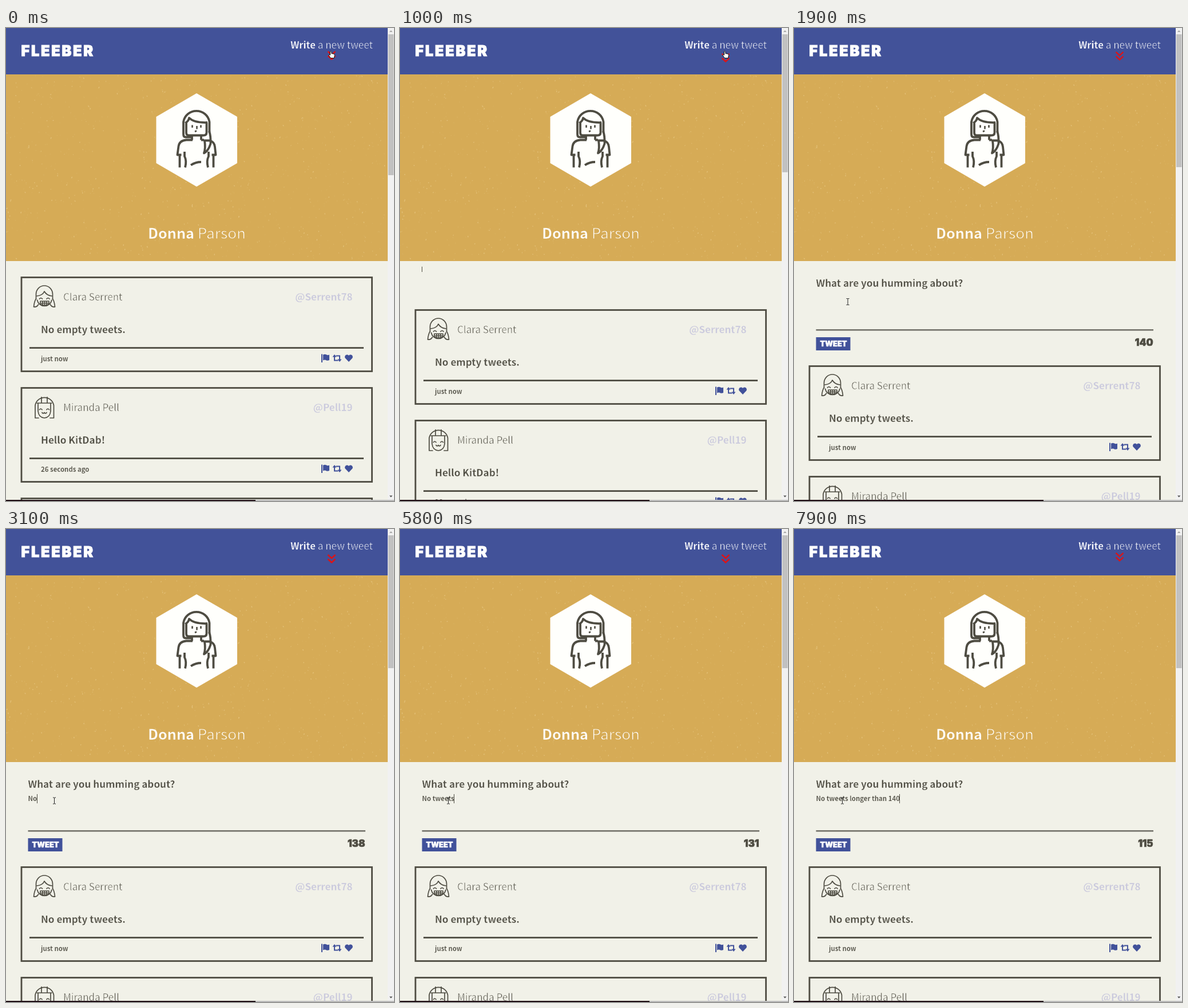
Animation, 678 px wide and 826 px high, one loop 8000 ms. Source, as an HTML page:

```html
<!DOCTYPE html>
<html lang="en">
<head>
<meta charset="utf-8">
<title>Message feed</title>
<style>
  html, body { margin: 0; width: 100%; height: 100%; overflow: hidden; background: #f1f1e8; }
  svg { display: block; width: 678px; height: 826px; --bg: #f1f1e8; }
  text { font-family: "Noto Sans CJK JP", "Noto Sans CJK SC", "Noto Sans", sans-serif; white-space: pre; fill: #4e4c42; }
  /* A stroke in the ground colour thins the letters */
  .semi { font-weight: 600; stroke: var(--bg); stroke-width: .018em; }
  .light { font-weight: 300; stroke: var(--bg); stroke-width: .032em; }
  .chunky { font-family: Inter, "DejaVu Sans", sans-serif; font-weight: 900; stroke-width: .04em; }
  .line { fill: none; stroke: #4e4c42; stroke-linecap: round; stroke-linejoin: round; }
</style>
</head>
<body>
<svg viewBox="0 0 678 826" xmlns="http://www.w3.org/2000/svg">
  <defs>
    <clipPath id="clip"><rect id="clipBox" x="25" width="616"/></clipPath>
    <g id="actions" fill="#41519a">
      <path d="M551 569.5h2V584h-2zM554 570.5q3.500 -1.500 6 0t5 0v9.500q-3 1.500 -5.500 .2t-5.500 .3z"/>
      <path d="M574 572V580.500H580.500M576.500 572.500H583V581" fill="none" stroke="#41519a" stroke-width="2"/>
      <path d="M570.500 574.500l3.500 -4.500l3.500 4.500zM579.500 578.500l3.500 4.500l3.500 -4.500z"/>
      <path d="M599 583l-6 -6.200c-3 -3.500 2 -9 6 -4.800c4 -4.200 9 1.300 6 4.800z"/>
    </g>
    <g id="face0" class="line" stroke-width="1.700">
      <path d="M52.500 473V465a14.500 15 0 0 1 29 0V473M54 468q10 -1 13 -8q4 7 13 8"/>
      <path d="M54.500 475a13 13 0 0 0 25.500 0M52.500 473q-3 4 -4 14q5 1 8 -4M81.500 473q3 4 4 14q-5 1 -8 -4"/>
      <path d="M58.500 473q2.500 -3 5 0M71 473q2.500 -3 5 0M60 477h15q1 7 -5 7h-5q-6 0 -5 -7zM60.500 480.500h14M64 477v6.500M67.500 477v7M71 477v6.500"/>
    </g>
    <g id="face1" class="line" stroke-width="1.700">
      <path d="M57 488H51V466a16.500 16.500 0 0 1 32.500 0V488H77"/>
      <path d="M56 462v14q1 11 11 12q10 -1 11 -12V462M54 462h26M62 451.500v10M72 451.500v10"/>
      <path d="M58.500 473.500q2 -3 4.500 0M71 473.500q2 -3 4.500 0M63 478.500q2 3 4 0q2 3 4 0"/>
    </g>
  </defs>

  <rect width="678" height="826" fill="#f1f1e8"/>
  <g id="feed"></g>

  <g clip-path="url(#clip)">
    <g id="form">
      <text x="38.500" y="452" class="semi" font-size="17.100">What are you humming about?</text>
      <text id="typed" x="38.500" y="475.300" class="semi" font-size="11.400"></text>
      <rect id="caret" y="463" width="1" height="16" fill="#4e4c42"/>
      <rect x="38.500" y="526" width="589.500" height="2.600" fill="#74736b"/>
      <rect x="38.500" y="540" width="60" height="23" fill="#41519a"/>
      <text x="69" y="555.500" class="chunky" font-size="12.800" text-anchor="middle" style="fill:#fff" stroke="#fff">TWEET</text>
      <text id="count" x="627.500" y="555" class="chunky" font-size="17" text-anchor="end" stroke="#4e4c42"></text>
    </g>
  </g>

  <rect y="81" width="667" height="326" fill="#d6ab56"/>
  <g id="specks" fill="none" stroke="#f3dca6" stroke-linecap="round"></g>
  <path d="M333 114L404 155V236L333 277L262.500 236V155z" fill="#fffffc"/>
  <g class="line" stroke-width="3.800" style="stroke-linecap:butt">
    <path d="M325 190.500H314q-4 0 -4 -5V164a23 22.500 0 0 1 45.500 0V182"/>
    <path d="M315 165V183q0 4.500 5 4.500H345q5.500 0 5.500 -5V165M313 166q6 -3 7 -9q9 9 32 8"/>
    <path d="M325 188v7.500M341 188v7.500M326 195.500h-11q-12 1 -13.500 11L299.500 221.500h7M341 195.500h5"/>
    <path d="M355 180q3 8 2.500 22q-4 13 -11.500 16.500q3 -8 1 -22h9q8 2 9 11L366.500 221.500h-7"/>
    <path d="M303.500 221V243.500M312 216v8q4 8 1 19.500M362.500 221V243.500M354 216v8q-4 8 -1 19.500M323 239.500q8 -5.500 18 -5.500"/>
    <path d="M325.500 169.500v4.500M340.500 169.500v4.500M333.500 171v5.500M330 181l3 -1.500" stroke-width="2.600"/>
  </g>
  <text x="333.500" y="368" text-anchor="middle" font-size="26.200" style="fill:#fff;--bg:#d6ab56"><tspan class="semi" font-size="25.200">Donna</tspan><tspan class="light"> Parson</tspan></text>

  <rect width="667" height="81" fill="#425299"/>
  <text x="26.500" y="49.300" class="chunky" font-size="25.300" letter-spacing="2.700" style="fill:#fff" stroke="#fff">FLEEBER</text>
  <text x="641" y="36" text-anchor="end" font-size="17.100" style="fill:#fff;--bg:#425299"><tspan class="semi" font-size="16.600">Write</tspan><tspan class="light"> a new tweet</tspan></text>
  <path id="chevrons" d="M562.500 45l6.500 6l6.500 -6M562.500 52.500l6.500 6l6.500 -6" fill="none" stroke="#dc1418" stroke-width="2.500"/>

  <rect x="667" width="11" height="826" fill="#f1f1f1"/>
  <rect id="thumb" x="668" y="11" width="9.500" fill="#c1c1c1"/>
  <path d="M670 7l2.700 -3l2.700 3z" fill="#a3a3a3"/>
  <path d="M670 816.500l2.700 3l2.700 -3z" fill="#505050"/>
  <rect y="824" width="678" height="2" fill="#bdbdbd"/>
  <rect y="824" width="436" height="2" fill="#1c0b12"/>

  <g id="pointer">
    <path id="hand" d="M-2.500 -6q1.500 -1 2.300 .5V-2.500L4 -1.800q1.500 .5 1.300 2.300L4.500 5.500H-1.500L-5 .8q0 -1.800 2 -1L-2.500 .3z" fill="#fff" stroke="#111" stroke-width="1"/>
    <path id="arrow" d="M-3 -6V5l2.600 -2.300L1 6.500l2 -.8L1.500 2H5z" fill="#fff" stroke="#111" stroke-width=".9"/>
    <path id="beam" d="M-2.500 -5.500h2l.5 .5l.5 -.5h2M0 -5V5M-2.500 5.500h2l.5 -.5l.5 .5h2" fill="none" stroke="#222" stroke-width="1"/>
  </g>
</svg>

<script>
const $ = id => document.getElementById(id);
const LOOP = 8000, STEP = 100;
const OPEN_AT = 752, OPEN_MS = 600, MARGIN = 27, FORM_H = 128;
const MESSAGE = "No tweets longer than 140";

// Key press times: pauses first, then an even run, then the number
const keys = [2800, 3100, 4700, 4900, 5100, 5300, 5400, 5600, 5700, 6000];
for (let i = 0; i < 11; i++) keys.push(6200 + i * 80);
keys.push(7100, 7300, 7400, 7600);

// Pointer path: time, x, y
const path = [
  [1100, 569, 47], [1200, 557, 51], [1300, 510, 98], [1500, 290, 292],
  [1700, 125, 448], [1900, 94, 478], [2200, 84.5, 474.5]
];

function card(i, name, handle, body, when) {
  return `<g transform="translate(0 ${i * 193})">
    <rect x="27" y="435.500" width="612.500" height="164" fill="none" stroke="#4e4c42" stroke-width="2.800"/>
    ${name && `<use href="#face${i}"/>
    <text x="100" y="476" class="light" font-size="17">${name}</text>
    <text x="605.500" y="476" class="semi" font-size="17" text-anchor="end" style="fill:#c9c8dd">${handle}</text>
    <text x="61" y="532.500" class="semi" font-size="17.100">${body}</text>
    <rect x="41" y="557.200" width="584" height="2.800" fill="#4e4c42"/>
    <text x="61" y="581.700" class="semi" font-size="11.400">${when}</text>
    <use href="#actions"/>`}
  </g>`;
}

$("feed").innerHTML =
  card(0, "Clara Serrent", "@Serrent78", "No empty tweets.", "just now") +
  card(1, "Miranda Pell", "@Pell19", "Hello KitDab!", "26 seconds ago") +
  card(2, "");

function scatter() {
  let seed = 7;
  const rnd = () => (seed = seed * 16807 % 2147483647) / 2147483647;
  let out = "";
  for (let layer = 0; layer < 3; layer++) {
    let d = "";
    for (let i = 0; i < 600 / (layer + 1); i++) {
      const x = 1 + rnd() * 664, y = 83 + rnd() * 322;
      d += `M${x.toFixed(1)} ${y.toFixed(1)}l${(rnd() * 1.6 - .8).toFixed(1)} ${(rnd() * 1.6).toFixed(1)}`;
    }
    out += `<path d="${d}" stroke-width="${.8 + layer * .25}" opacity="${.2 + layer * .13}"/>`;
  }
  $("specks").innerHTML = out;
}
scatter();

const clamp = x => Math.min(1, Math.max(0, x));
const ease = x => 1 - Math.pow(1 - x, 2.3);

function bounce(t) {
  const stops = [[.2, 0], [.4, -8], [.5, 0], [.6, -4], [.8, 0]];
  const p = ((t - 800 + LOOP) % 2000) / 2000;
  for (let i = 1; i < stops.length; i++) {
    const [a, from] = stops[i - 1], [b, to] = stops[i];
    if (p >= a && p <= b) return from + (to - from) * ease((p - a) / (b - a));
  }
  return 0;
}

function pointerAt(t) {
  if (t <= path[0][0]) return path[0].slice(1);
  for (let i = 1; i < path.length; i++) {
    const [t0, x0, y0] = path[i - 1], [t1, x1, y1] = path[i];
    if (t <= t1) {
      const k = (t - t0) / (t1 - t0);
      return [x0 + (x1 - x0) * k, y0 + (y1 - y0) * k];
    }
  }
  return path[path.length - 1].slice(1);
}

const show = (id, on) => $(id).setAttribute("visibility", on ? "visible" : "hidden");
const move = (id, x, y) => $(id).setAttribute("transform", `translate(${x} ${y})`);

function draw(t) {
  // Form slides open, scrolled so that its caret stays in view
  const p = .5 - .5 * Math.cos(Math.PI * clamp((t - OPEN_AT) / OPEN_MS));
  const scroll = Math.min(36, (1 - p) * FORM_H);
  move("feed", 0, Math.round(p * (MARGIN + FORM_H)));
  move("form", 0, Math.round((p - 1) * MARGIN - scroll));
  $("clipBox").setAttribute("y", 407 + p * MARGIN);
  $("clipBox").setAttribute("height", p * FORM_H + 1);
  $("thumb").setAttribute("height", 246 - 14 * p);

  const n = keys.filter(k => k <= t).length;
  const last = n ? keys[n - 1] : 1200;
  $("typed").textContent = MESSAGE.slice(0, n);
  $("count").textContent = 140 - n;
  $("caret").setAttribute("x", Math.round(38 + (n ? $("typed").getComputedTextLength() : 0)));
  show("caret", p > 0 && (t - last + 100) % 1000 < 500);

  move("chevrons", 0, bounce(t));

  const [x, y] = pointerAt(t);
  move("pointer", x, y);
  show("hand", y < 60);
  show("arrow", y >= 60 && y < 462);
  show("beam", y >= 462);
}

function tick(now) {
  draw(Math.floor(now % LOOP / STEP) * STEP);
  requestAnimationFrame(tick);
}
draw(0);
requestAnimationFrame(tick);
</script>
</body>
</html>
```
